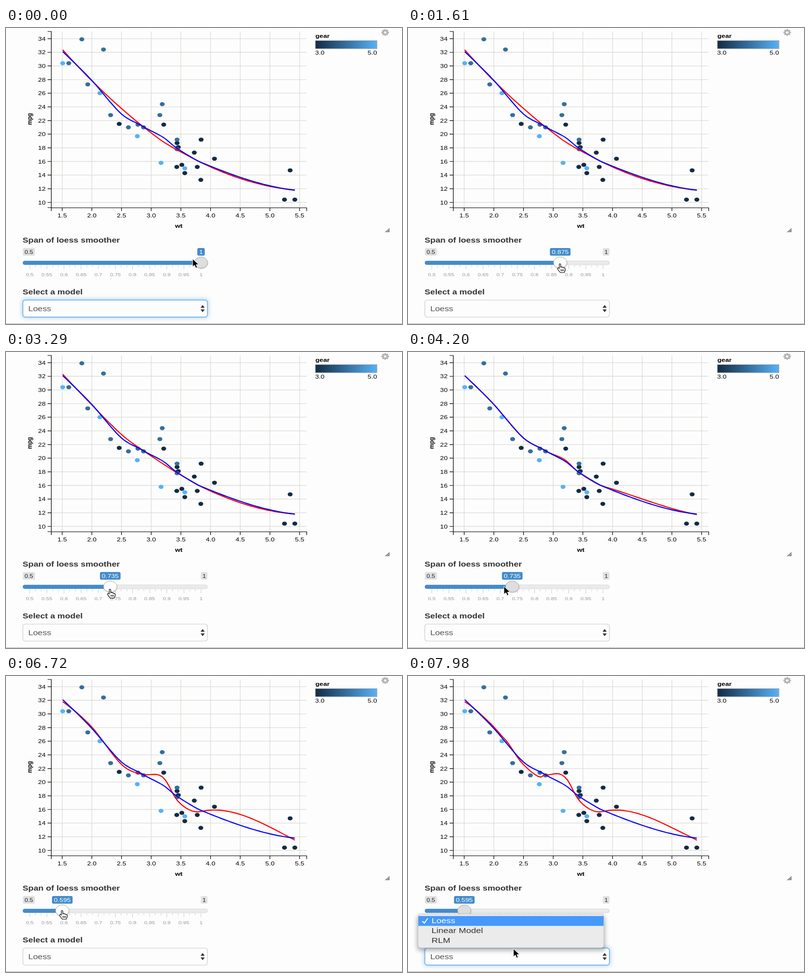
These frames come from a looping animation (800 by 600 pixels, 8 s). An HTML page:

```html
<!DOCTYPE html>
<html lang="en">
<head>
<meta charset="utf-8">
<title>Loess smoother</title>
<style>
  html, body { margin: 0; width: 100%; height: 100%; overflow: hidden; background: #fdfdfd; }
  svg { display: block; width: 800px; height: 600px; }
  text { font-family: "Liberation Sans", Arial, sans-serif; white-space: pre; }
</style>
</head>
<body>
<svg viewBox="0 0 800 600">
  <defs>
    <linearGradient id="ramp">
      <stop offset="0" stop-color="#132b43"/>
      <stop offset="1" stop-color="#56b1f7"/>
    </linearGradient>
    <filter id="blur" x="-20%" y="-60%" width="140%" height="220%"><feGaussianBlur stdDeviation="4"/></filter>
  </defs>
  <g id="fixed"></g>
  <g id="live"></g>
</svg>
<script>
const LOOP = 8000, STEP = 70;

// mtcars: [wt, mpg] by number of gears
const CARS = {
  3: [[3.215, 21.4], [3.44, 18.7], [3.46, 18.1], [3.57, 14.3], [4.07, 16.4], [3.73, 17.3], [3.78, 15.2], [5.25, 10.4],
    [5.424, 10.4], [5.345, 14.7], [2.465, 21.5], [3.52, 15.5], [3.435, 15.2], [3.84, 13.3], [3.845, 19.2]],
  4: [[2.62, 21], [2.875, 21], [2.32, 22.8], [3.19, 24.4], [3.15, 22.8], [3.44, 19.2], [3.44, 17.8], [2.2, 32.4],
    [1.615, 30.4], [1.835, 33.9], [1.935, 27.3], [2.78, 21.4]],
  5: [[2.14, 26], [1.513, 30.4], [3.17, 15.8], [2.77, 19.7], [3.57, 15]]
};
const GEAR_COLORS = { 3: '#132b43', 4: '#356e9d', 5: '#56b1f7' };
const sorted = Object.values(CARS).flat().sort((a, b) => a[0] - b[0]);
const weights = sorted.map(car => car[0]);
const first = weights[0], last = weights[weights.length - 1];

const range = (n, fn) => Array.from({ length: n }, (_, i) => fn(i));
const px = wt => 113 + (wt - 1.5) * 119.9;
const py = mpg => 353.5 - (mpg - 10) * 13.83;
const thumbX = value => 48 + (value - 0.5) * 692;
const progress = (t, from, to) => Math.min(1, Math.max(0, (t - from) / (to - from)));
const smooth = u => u * u * (3 - 2 * u);
const mix = (a, b, u) => a + (b - a) * u;

// Local quadratic fit at x0 with tricube weights: value and slope.
function localFit(x0, span) {
  const count = Math.floor(weights.length * span + 1e-5);
  const reach = weights.map(x => Math.abs(x - x0)).sort((a, b) => a - b)[count - 1];
  const s = range(5, () => 0), r = range(3, () => 0);
  for (const [x, y] of sorted) {
    const d = x - x0, u = Math.abs(d) / reach;
    if (u >= 0.999) continue;
    const w = (1 - u ** 3) ** 3;
    for (let k = 0; k < 5; k++) s[k] += w * d ** k;
    for (let k = 0; k < 3; k++) r[k] += w * y * d ** k;
  }
  const det = (a, b, c) => a[0] * (b[1] * c[2] - b[2] * c[1])
    - b[0] * (a[1] * c[2] - a[2] * c[1]) + c[0] * (a[1] * b[2] - a[2] * b[1]);
  const c0 = s.slice(0, 3), c1 = s.slice(1, 4), c2 = s.slice(2, 5), d = det(c0, c1, c2);
  return { x: x0, y: det(r, c1, c2) / d, slope: det(c0, r, c2) / d };
}

// Cuts at the median car until each cell holds at most `cap` cars.
function cuts(lo, hi, cap) {
  if (hi - lo + 1 <= cap) return [];
  let m = (lo + hi) >> 1;
  while (m > lo && weights[m] === weights[m + 1]) m--;
  return [...cuts(lo, m, cap), weights[m], ...cuts(m + 1, hi, cap)];
}

// Loess curve: cubic Hermite interpolation between the fitted vertices.
function loess(span) {
  const margin = 0.005 * (last - first);
  const cap = Math.floor(weights.length * span * 0.2);
  const knots = [first - margin, ...cuts(0, weights.length - 1, cap), last + margin]
    .map(x => localFit(x, span));
  return range(80, i => {
    const x = mix(first, last, i / 79);
    const k = knots.findIndex(knot => knot.x > x);
    const a = knots[k - 1], b = knots[k], h = b.x - a.x, u = (x - a.x) / h, v = 1 - u;
    return a.y * (1 + 2 * u) * v * v + b.y * smooth(u) + h * u * v * (a.slope * v - b.slope * u);
  });
}

const DRAGS = [
  { from: 840, to: 1950, value: 0.82 },
  { from: 2500, to: 3200, value: 0.735 },
  { from: 4550, to: 4900, value: 0.63 },
  { from: 5450, to: 6600, value: 0.595 }
];
const sliderValue = t => DRAGS.reduce((v, drag) => mix(v, drag.value, progress(t, drag.from, drag.to)), 1);
const isDragging = t => (t >= 840 && t < 3600) || (t >= 4520 && t < 6850);

// The red curve eases to each new span shortly after the drag rests.
const FITS = DRAGS.map(drag => ({ start: drag.to + 200, ys: loess(drag.value) }));
const START_FIT = loess(1), DEFAULT_FIT = loess(0.75);
const redCurve = t => FITS.reduce((ys, fit) => {
  const u = smooth(progress(t, fit.start, fit.start + 250));
  return ys.map((y, i) => mix(y, fit.ys[i], u));
}, START_FIT);

// Pointer stops: time, x, y
const STOPS = [
  [0, 377, 468], [840, 391, 477], [3600, 210, 481], [4150, 193, 475],
  [4520, 210, 475], [6850, 112, 475], [7500, 215, 568], [7950, 213, 553]
];
function pointerAt(t) {
  const k = Math.max(1, STOPS.findIndex(stop => stop[0] > t));
  const end = t >= 7950 ? STOPS.length - 1 : k;
  const a = STOPS[end - 1], b = STOPS[end], u = smooth(progress(t, a[0], b[0]));
  return { x: isDragging(t) ? thumbX(sliderValue(t)) - 1 : mix(a[1], b[1], u), y: mix(a[2], b[2], u) };
}

function text(x, y, string, { size = 11, fill = '#000', anchor = 'start', weight = 400, turn = 0 } = {}) {
  return `<text transform="translate(${x} ${y}) scale(1.24 1.03) rotate(${turn})" font-size="${size}"
    font-weight="${weight}" fill="${fill}" text-anchor="${anchor}">${string}</text>`;
}
const rect = (x, y, w, h, fill, rx = 0, more = '') =>
  `<rect x="${x}" y="${y}" width="${w}" height="${h}" rx="${rx}" fill="${fill}" ${more}/>`;
const path = (d, stroke, width = 1, fill = 'none', more = '') =>
  `<path d="${d}" stroke="${stroke}" stroke-width="${width}" fill="${fill}" ${more}/>`;
const curve = (ys, color) => path('M' + ys.map((y, i) =>
  `${px(mix(first, last, i / 79)).toFixed(2)} ${py(y).toFixed(2)}`).join('L'), color, 2.2);

function chart() {
  const wts = range(9, i => 1.5 + i / 2), mpgs = range(13, i => 10 + 2 * i);
  const grid = wts.map(w => `M${px(w) + .5} 7V364`).join('') + mpgs.map(m => `M91 ${py(m)}H607`).join('');
  const axes = 'M84 7H91.5V364H84M91.5 371V364.5H607.5V371'
    + wts.map(w => `M${px(w) + .5} 364V371`).join('') + mpgs.map(m => `M84 ${py(m)}H91`).join('');
  const dots = Object.entries(CARS).flatMap(([gear, cars]) => cars.map(([wt, mpg]) =>
    `<ellipse cx="${px(wt)}" cy="${py(mpg)}" rx="4.95" ry="4.1" fill="${GEAR_COLORS[gear]}"/>`));
  return path(grid, '#dcdcd8', 1.3) + path(axes, '#000', 1.2)
    + wts.map(w => text(px(w) + .5, 384, w.toFixed(1), { anchor: 'middle' })).join('')
    + mpgs.map(m => text(80, py(m) + 4, m, { anchor: 'end' })).join('')
    + text(349, 405, 'wt', { anchor: 'middle', weight: 700 })
    + text(52, 184.5, 'mpg', { anchor: 'middle', weight: 700, turn: -90 })
    + dots.join('');
}

function legend() {
  const teeth = range(8, i => `<rect x="-1.6" y="-7" width="3.2" height="4" transform="rotate(${i * 45})"/>`).join('');
  return text(625, 20, 'gear', { weight: 700 })
    + rect(625, 25.5, 124.5, 16.5, 'url(#ramp)', 0, 'stroke="#aaa"')
    + text(624.5, 54, '3.0') + text(749.5, 54, '5.0', { anchor: 'end' })
    + `<g transform="translate(766 9) scale(1.1 .95)" fill="#b0b0b0">${teeth}
       <circle r="3.8" fill="none" stroke="#b0b0b0" stroke-width="2.6"/></g>`
    + path('M775 406V414H766Z', 'none', 0, '#aaa') + path('M775 406L766 414M775 410L771 414', '#555');
}

function sliderScale() {
  const ticks = range(31, i => `M${48 + i * 34.6 / 3} 481v${i % 3 ? 4 : 8}`).join('');
  return path(ticks, '#ccc')
    + range(11, i => text(48 + i * 34.6, 502.5, +(0.5 + i * 0.05).toFixed(2),
      { size: 9, fill: '#999', anchor: 'middle' })).join('');
}

function slider(t) {
  const value = Math.round(sliderValue(t) * 200) / 200, x = thumbX(value), label = String(value);
  const width = 7.5 + 1.24 * 11 * (label.length > 1 ? 0.556 * (label.length - 1) + 0.278 : 0.556);
  const maxShown = x + width / 2 < 392;
  const small = { size: 10, fill: '#222' };
  return rect(34, 446, 24.5, 15.5, '#e1e1e1', 3) + text(37.5, 457.5, '0.5', small)
    + (maxShown ? rect(393.5, 446, 13.5, 15.5, '#e1e1e1', 3) + text(397, 457.5, '1', small) : '')
    + rect(34, 472, 373, 8, '#eaeaea', 4, 'stroke="#d4d4d4" stroke-width=".8"')
    + rect(34, 472, x - 34, 8, '#428bca', 4)
    + rect(x - width / 2, 446, width, 15.5, '#428bca', 3)
    + text(x, 458, label, { fill: '#fff', anchor: 'middle' })
    + `<ellipse cx="${x + .5}" cy="477" rx="14" ry="11.5" fill="#0002"/>
       <ellipse cx="${x}" cy="475.5" rx="13.6" ry="11.3" fill="${isDragging(t) ? '#fff' : '#dedede'}" stroke="#aaa"/>`;
}

function select(t) {
  const focus = t < LOOP / 2 ? 1 - progress(t, 840, 960) : progress(t, 7500, 7700);
  return rect(32, 549, 377, 39, '#66afe9', 6, `opacity="${focus * .5}" filter="url(#blur)"`)
    + rect(34, 551.5, 373, 34.5, '#fdfdfd', 5, 'stroke="#ccc" stroke-width="1.2"')
    + rect(34, 551.5, 373, 34.5, 'none', 5, `stroke="#66afe9" stroke-width="1.4" opacity="${focus}"`)
    + text(45, 574, 'Loess', { size: 14, fill: '#555' })
    + path('M393 567H401.5L397.25 561.5ZM393 570.5H401.5L397.25 576Z', 'none', 0, '#333');
}

function menu(t) {
  if (t < 7700) return '';
  const row = { size: 14.5, fill: '#333' };
  return rect(18, 486, 380, 71, '#000', 6, 'opacity=".28" filter="url(#blur)"')
    + rect(20.5, 482.5, 375, 68.5, '#ebebeb', 5, 'stroke="#c4c4c4"')
    + rect(21, 486.5, 374, 20, '#4499fa')
    + path('M29 497L33 501L40 491', '#fff', 2)
    + text(47.5, 501, 'Loess', { ...row, fill: '#fff' })
    + text(47.5, 521, 'Linear Model', row) + text(47.5, 541, 'RLM', row);
}

function pointer(t) {
  const { x, y } = pointerAt(t);
  const shape = isDragging(t)
    ? path('M4 10V2Q4 0 5.5 0T7 2V7Q9 5.5 10 7.5Q12 6.5 13 8.5Q16 8 16 11V13L14 18H6L1 11.5Q0 9 1.5 8.5T4 10Z'
      + 'M7.5 11.5V15M10 11.5V15M12.5 11.5V15', '#000', 1.2, '#fff', 'transform="translate(-5 0)"')
    : path('M0 0V16L4 12.7L6.5 18.5L9.5 17.3L7 11.7H12.5Z', '#fff', 1, '#000');
  return `<g transform="translate(${x} ${y})">${shape}</g>`;
}

const heading = { size: 14, weight: 700, fill: '#333' };
document.getElementById('fixed').innerHTML = chart() + legend() + sliderScale()
  + text(33.5, 435, 'Span of loess smoother', heading) + text(33.5, 540, 'Select a model', heading)
  + rect(0, 598.8, 800, 1.2, '#bbb');

const live = document.getElementById('live');
function draw() {
  const t = Math.floor(performance.now() % LOOP / STEP) * STEP;
  live.innerHTML = curve(redCurve(t), '#f00') + curve(DEFAULT_FIT, '#00f')
    + slider(t) + select(t) + menu(t) + pointer(t);
  requestAnimationFrame(draw);
}
draw();
</script>
</body>
</html>
```
